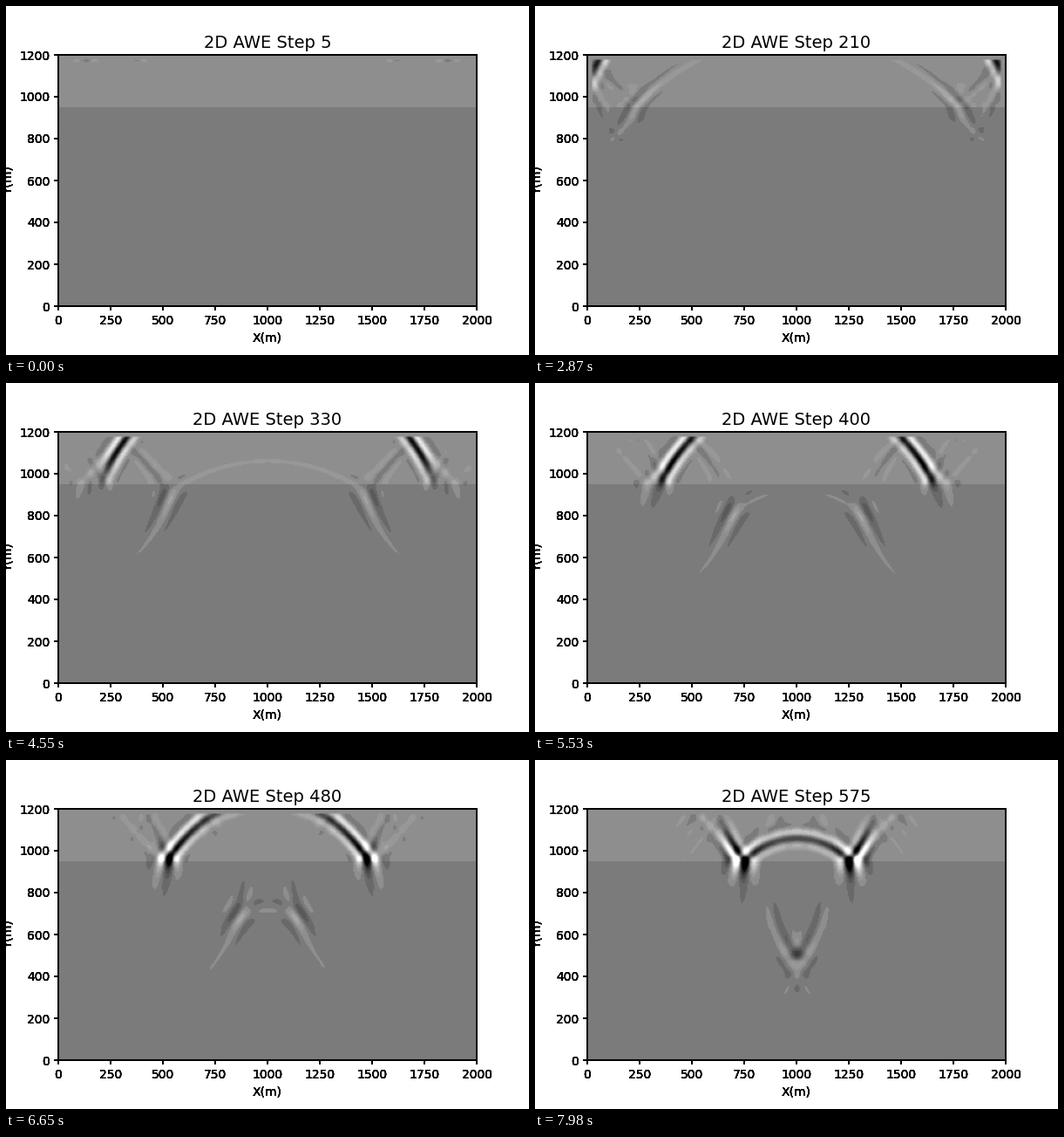
A matplotlib script for the animation above (8 s loop, 600 by 400 pixels).

```python
import numpy as np
import matplotlib.pyplot as plt
from matplotlib.animation import FuncAnimation

# Acoustic model: a slow layer over a fast half space, fixed edges
NZ, NX, DX, DT = 240, 400, 5.0, 0.001
LAYER = 50              # rows in the upper layer
EDGE = 4                # cells held at zero along each side
SURFACE = 5             # row of the shot and the receivers
STEPS, EVERY, SHOWN = 800, 5, 115
FREQ, DELAY = 20.0, 0.042

# Playback
LOOP, INTERVAL, HOLD = 8000, 40, 70

velocity = np.full((NZ, NX), 2550.0)
velocity[:LAYER] = 1900.0
courant = ((velocity * DT / DX) ** 2).astype(np.float32)

STENCIL = [-205 / 72, 8 / 5, -1 / 5, 8 / 315, -1 / 560]


def laplacian(u):
    """Eighth-order Laplacian of the inner cells."""
    e = EDGE
    out = (2 * STENCIL[0]) * u[e:-e, e:-e]
    for k in range(1, e + 1):
        ring = u[e - k:NZ - e - k, e:-e] + u[e + k:NZ - e + k, e:-e]
        ring += u[e:-e, e - k:NX - e - k]
        ring += u[e:-e, e + k:NX - e + k]
        out += STENCIL[k] * ring
    return out


def propagate(steps, drive):
    """Yield the field after each step; drive(n) feeds the surface row."""
    inner = (slice(EDGE, -EDGE), slice(EDGE, -EDGE))
    old = np.zeros((NZ, NX), np.float32)
    now = old.copy()
    for n in range(steps):
        new = np.zeros_like(now)
        new[inner] = (2 * now[inner] - old[inner]
                      + courant[inner] * laplacian(now))
        new[SURFACE, EDGE:-EDGE] += drive(n)[EDGE:-EDGE]
        old, now = now, new
        yield now


def shot(n):
    a = (np.pi * FREQ * (n * DT - DELAY)) ** 2
    row = np.zeros(NX, np.float32)
    row[NX // 2] = (1 - 2 * a) * np.exp(-a)
    return row


record = [u[SURFACE].copy() for u in propagate(STEPS, shot)]


def reversed_record(n):
    return record[STEPS - 1 - n]


back = propagate(EVERY * SHOWN, reversed_record)
fields = [u for n, u in enumerate(back, 1) if n % EVERY == 0]

# Grey levels: the wave is added to the two layer tones
tone = np.full((NZ, 1), 123.0)
tone[:LAYER] = 142.0
gain = 135 / -fields[65][10:40].min()
levels = np.array([*range(0, 106, 15), 123, 142, *range(152, 256, 14), 255])
cuts = (levels[1:] + levels[:-1]) / 2


def shade(k):
    return levels[np.digitize(tone + gain * fields[k], cuts)]


def harden(img, dpi):
    """Thicken antialiased edges as if drawn several times."""
    out = np.zeros_like(img)
    out[..., 3] = 1 - (1 - img[..., 3]) ** 6
    return out, 0, 0


plt.rcParams["font.family"] = "DejaVu Sans"
fig = plt.figure(figsize=(6, 4), dpi=100, facecolor="white")
ax = fig.add_axes([0.1, 0.1, 0.8, 0.8])
image = ax.imshow(shade(0), cmap="gray", vmin=0, vmax=255,
                  extent=[0, 2000, 0, 1200])
ax.set_xticks(range(0, 2001, 250))
ax.set_yticks(range(0, 1201, 200))
ax.set_xlabel("X(m)")
ax.set_ylabel("Y(m)")
ax.tick_params(width=1.44)
for spine in ax.spines.values():
    spine.set_linewidth(1.44)
for axis in (ax.xaxis, ax.yaxis):
    axis.set_agg_filter(harden)
title = ax.set_title("", fontsize=14)


def update(i):
    k = min((i * INTERVAL + 30) // HOLD, SHOWN - 1)
    image.set_data(shade(k))
    title.set_text(f"2D AWE Step {EVERY * (k + 1)}")
    return image, title


anim = FuncAnimation(fig, update, frames=LOOP // INTERVAL, interval=INTERVAL,
                     repeat=True, repeat_delay=0, blit=False)
plt.show()
```
